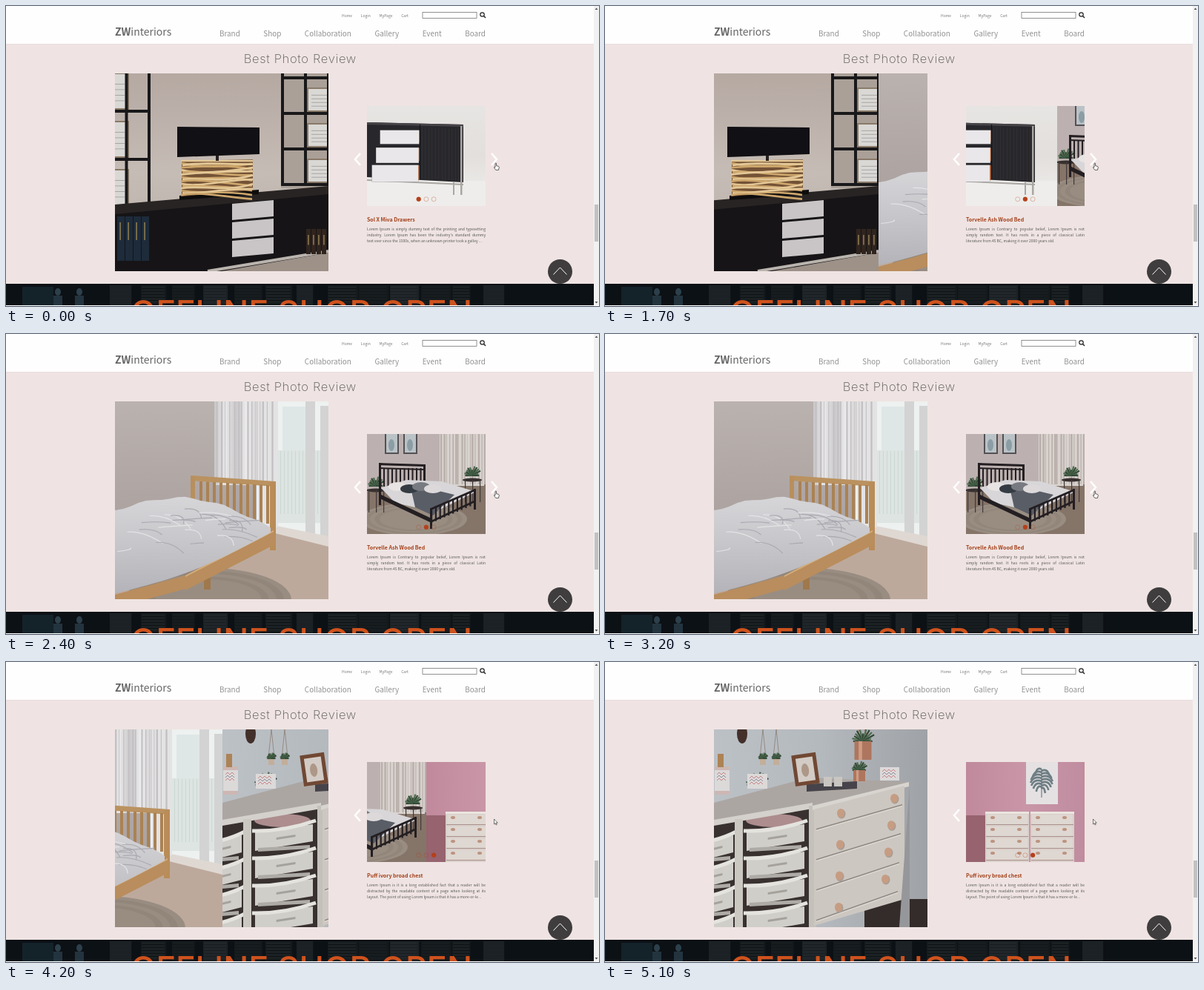
Write an HTML page that moves like this. It is 800 px wide and 405 px high and loops after 5200 ms.

```html
<!DOCTYPE html>
<html lang="en">
<head>
<meta charset="utf-8">
<title>Photo review slider</title>
<style>
html,body{margin:0;width:100%;height:100%;overflow:hidden;background:#efe4e3}
body{font-family:"Noto Sans CJK KR","Noto Sans CJK JP","Noto Sans",sans-serif}
svg{position:absolute;left:0;top:0;display:block}
nav{position:absolute;display:flex;justify-content:space-between;white-space:nowrap}
#menu{left:453px;top:9px;width:90px;font-size:5px;line-height:8px;color:#777}
#main{left:288px;top:29px;width:359px;font-size:9.9px;line-height:16px;font-weight:300;color:#919191}
#note{position:absolute;left:487px;top:282px;width:160px;color:#555}
#note b{display:block;font-size:7px;line-height:12px;color:#a33f18;margin-bottom:3px;white-space:nowrap}
#note div{font-size:5px;line-height:8px;height:8px;text-align:justify;text-align-last:justify}
#note div:last-child{text-align-last:left;white-space:nowrap}
</style>
</head>
<body>
<svg id="stage" width="800" height="405" viewBox="0 0 800 405"></svg>
<nav id="menu"><span>Home</span><span>Login</span><span>MyPage</span><span>Cart</span></nav>
<nav id="main"><span>Brand</span><span>Shop</span><span>Collaboration</span><span>Gallery</span><span>Event</span><span>Board</span></nav>
<div id="note"></div>
<script>
const BIG = {id: 'big', x: 147, y: 91, w: 288, h: 267};
const SMALL = {id: 'small', x: 487, y: 135, w: 160, h: 135};

// Box with upright sides; the right end of its top and bottom edges is raised by rise and lift
const box = (x, y, w, h, fill, rise = 0, lift = rise) =>
  `<path d="M${x} ${y}L${x + w} ${y - rise}V${y + h - lift}L${x} ${y + h}Z" fill="${fill}"/>`;
const line = (d, stroke, w = 1, fill = 'none') => `<path d="${d}" stroke="${stroke}" stroke-width="${w}" fill="${fill}"/>`;
const oval = (x, y, rx, ry, fill) => `<ellipse cx="${x}" cy="${y}" rx="${rx}" ry="${ry}" fill="${fill}"/>`;
const times = (n, fn) => Array.from({length: n}, (_, i) => fn(i)).join('');
const noise = n => { const v = Math.sin(n * 12.9898 + 4) * 43758.5453; return v - Math.floor(v); };
const backdrop = (view, fill) => box(view.x, view.y, view.w, view.h, fill);
const clip = v => `<clipPath id="${v.id}View">${backdrop(v, '#000')}</clipPath>`;
const grad = (id, down, ...stops) => `<linearGradient id="${id}" ${down ? 'x2="0" y2="1"' : ''}>${stops.map((c, i) =>
  `<stop offset="${i / (stops.length - 1)}" stop-color="${c}"/>`).join('')}</linearGradient>`;

const defs = `<defs>${clip(BIG)}${clip(SMALL)}
  ${grad('plaster', 1, '#b5a9a2', '#c5bcb5', '#b9aea8')}
  ${grad('bedroom', 1, '#bab2af', '#aea5a3', '#a39a98')}
  ${grad('curtain', 0, '#c9c7c8', '#e9e8e9', '#cbc9ca', '#eeeeef', '#d2d0d0')}
  ${grad('quilt', 1, '#d6d5d8', '#c6c5c9', '#b4b3b9')}
  ${grad('cool', 0, '#bcc1c6', '#b4b9be', '#9fa2a6')}
  ${grad('pink', 0, '#c08a9c', '#c996a8', '#c08c9f')}
  ${grad('studio', 1, '#e7e5e3', '#e2dfdc', '#f1f0ef')}
</defs>`;

const award = (x, y, w, h) => box(x, y, w, h, '#8a7a68') + box(x + 2, y + 2, w - 4, h - 4, '#d9d8d5') +
  times(4, i => box(x + 6, y + h * (.3 + i * .15), w - 12, .8, '#9b9a98'));
const binders = (x, y, n, w, h, fill) => times(n, i => box(x + i * w, y, w - 1, h, fill) + box(x + (i + .3) * w, y + 8, 1.6, h * .4, '#8d7b51'));
const folds = (x, y, w, h, n, tone) => times(n, i => box(x + (i + noise(i) * .6) * w / n, y, .5 + noise(i + 9) * 2, h, tone));
const rug = (x, y, rx, ry) => times(5, i => oval(x, y, rx * (1 - i * .09), ry * (1 - i * .09), i % 2 ? '#92867b' : '#998d82'));
const slats = (n, x, y, gap, w, h, fill, rise = 0) => times(n, i => box(x + i * gap, y - i * rise, w, h, fill));
const leaves = (x, y, r) => times(13, i => {
  const a = Math.PI * (1 + i / 12), len = r * (.7 + noise(i) * .6);
  return line(`M${x} ${y}l${len * Math.cos(a)} ${len * Math.sin(a)}`, i % 2 ? '#4f6b50' : '#324936', 2.2);
});

function shelving(x, w, y, gap, n, awardX) {
  const ink = '#19181a';
  return times(n, i => award(awardX, y + i * gap + 15, 34, gap - 15) + box(x, y + i * gap, w, 4, ink))
    + box(x, y + n * gap, w, 4, ink) + times(3, i => box(x + i * (w - 4) / 2, 80, 4, y + n * gap - 80, ink));
}

function sideboard() {
  const branch = i => {
    const y = 209 + i * 3.1, sway = k => y + 6 * Math.sin(i * k);
    return line(`M${236 + i % 3} ${y}C260 ${sway(2)} 295 ${sway(1.7)} ${333 - i % 2} ${sway(3)}`, i % 2 ? '#cda66c' : '#e4c897', 2.7);
  };
  return backdrop(BIG, 'url(#plaster)') + box(371, 91, 64, 155, '#aaa098')
    + shelving(130, 65, 75, 65, 3, 132) + shelving(371, 66, 95, 48, 3, 406)
    + box(147, 330, 288, 28, '#9d9188') + box(147, 268, 288, 14, '#292424', 25) + box(147, 281, 288, 102, '#161416', 27, 50)
    + line('M272 358L435 331', '#bab4ae', 4) + binders(150, 284, 4, 11, 60, '#1d2b3b') + binders(405, 301, 4, 7, 34, '#30241e')
    + times(3, i => box(305, 267 + i * 25, 56, 22, '#c9c5c6', 5))
    + box(234, 256, 107, 6, '#0e0d0e', 8) + box(237, 209, 96, 48, '#735236', 2, 8) + times(16, branch)
    + box(283, 199, 4, 10, '#262021') + box(231, 163, 111, 41, '#111014', -1, 4);
}

function drawers() {
  const drawer = i => {
    const x = 505 - i * 5.5, y = 168 + i * 23.5, w = 52 + i * 5, h = 18 + i * 2;
    return box(x + w - 2, y, 560 - x - w, h - 2, '#a34e21') + box(x - .5, y - .5, w + 1, h + 1, '#aaa7a7') + box(x, y, w, h, '#e9e7e9');
  };
  return backdrop(SMALL, 'url(#studio)') + box(487, 236, 160, 34, '#eeedeb') + box(487, 157, 130, 74, '#28272b', -3, -7)
    + box(487, 157, 130, 3, '#474448', -3) + slats(12, 561, 163, 4.5, .6, 70, '#38363c', -.3) + box(558, 160, 1, 74, '#111114')
    + box(487, 234, 130, 2, '#aaa6a2', -6) + box(603, 238, 2, 17, '#aaa6a2') + box(613, 162, 2.5, 93, '#aaa6a2')
    + times(3, drawer);
}

function oakBed() {
  const top = u => 238 + 24 * u - 28 * Math.sin(Math.PI * u) + 1.5 * Math.sin(u * 25);
  const hem = u => 350 - 82 * u + 10 * Math.sin(Math.PI * u);
  const at = (u, y) => `${BIG.x + 210 * u} ${y}`;
  const edge = [...Array(21).keys()].map(i => i / 20);
  const quilt = 'M' + edge.map(u => at(u, top(u))).concat(edge.reverse().map(u => at(u, hem(u)))).join('L') + 'Z';
  const crease = i => {
    const u = noise(i) * .75, v = .15 + noise(i + 30) * .5, y = top(u) + (hem(u) - top(u)) * v;
    return line(`M${at(u, y)}Q${at(u + .1, y - 2)} ${at(u + .08 + noise(i + 60) * .15, y + 25 * noise(i + 90) - 5)}`, i % 3 ? '#aaa9b0' : '#e4e3e6', 1.2);
  };
  return backdrop(BIG, 'url(#bedroom)') + box(147, 300, 288, 58, '#bda99c', 40, 0) + rug(273, 359, 112, 43)
    + box(338, 91, 97, 172, '#edf1f0', 0, -15) + slats(7, 373, 98, 4, 7, 80, '#dfe6e6') + box(364, 157, 72, 98, '#dde4e1')
    + slats(12, 365, 158, 5, .7, 85, '#c3d3cf') + slats(2, 404, 91, 20, 13, 185, '#d3d3d3', -6) + box(355, 257, 80, 10, '#dfd8d2', -16, -20)
    + box(281, 91, 59, 113, 'url(#curtain)') + box(340, 91, 27, 170, '#e3e3e3') + folds(282, 91, 80, 110, 14, '#c3c0c3')
    + box(249, 191, 115, 7, '#ba9260', -8) + slats(11, 261, 199, 9, 4, 52, '#aa8253', -.5)
    + box(249, 192, 6, 55, '#b88f5d') + box(356, 200, 8, 92, '#b98c58')
    + box(267, 325, 9, 20, '#9f784c') + box(147, 352, 95, 18, '#b98d5d', 26) + box(242, 326, 119, 20, '#b98d5d', 61) + box(242, 326, 119, 2, '#d5ae7c', 61)
    + `<path d="${quilt}" fill="url(#quilt)"/>` + times(26, crease);
}

function blackBed() {
  const ink = '#231e21';
  const print = i => box(511 + i * 25, 125, 19, 37, '#535155') + box(513 + i * 25, 125, 15, 35, '#bac2c6') + oval(520 + i * 25, 150, 4, 8, '#8b9da5');
  const table = (x, y) => oval(x, y, 13, 2.5, '#37302f') + slats(3, x - 10, y, 10, 1.2, 30, '#413938') + leaves(x, y - 6, 10);
  const pillow = (c, i) => oval(528 + i * 16, 206 + i % 2 * 3, 12, 6, c);
  return backdrop(SMALL, '#bcb1b0') + box(487, 213, 160, 57, '#857468', 14, 0) + rug(550, 250, 72, 22)
    + box(585, 135, 60, 70, '#d9d3cf') + folds(585, 135, 62, 68, 16, '#b9afaa')
    + times(2, print) + table(499, 211) + table(629, 197)
    + box(503, 174, 62, 3, ink, -2) + box(503, 180, 62, 2, ink, -2) + slats(10, 509, 181, 5.5, 2, 25, ink) + box(503, 174, 3, 57, ink) + box(563, 176, 3, 30, ink)
    + `<path d="M506 208L540 197 588 199 634 213 579 240 525 228Z" fill="#d8d6d8"/><path d="M547 212L572 209 605 217 576 245 552 234Z" fill="#595d66"/>`
    + ['#e7e4e3', '#353b43', '#777a80', '#ddd9da'].map(pillow).join('')
    + box(504, 216, 70, 6, ink, -33) + box(573, 235, 60, 3, ink, 26) + box(573, 252, 60, 3, ink, 28)
    + slats(11, 573, 235, 5.8, 2.2, 20, ink, 2.5) + box(572, 235, 3, 28, ink) + box(631, 209, 3, 28, ink);
}

function tallChest() {
  const basket = (x, w, y) => box(x + 4, y, w - 8, 27, '#d0cec9', 9, 13) + box(x + 8, y + 23, w - 16, 5, '#aeaba6', 4)
    + line(`M${x} ${y}Q${x + w / 2} ${y + 1} ${x + w} ${y - 14}`, '#e4e3de', 5) + box(x + w * .38, y + 9, w * .3, 3, '#a5a29c', 4);
  const vase = x => line(`M${x} 91l-4 38M${x} 91l4 38`, '#857669', .7) + box(x - 4, 129, 8, 10, '#c3ae9a') + leaves(x, 130, 6);
  const pot = (x, y, w, h) => leaves(x, y, w * .6) + box(x - w / 2, y, w, h, '#ae765e') + box(x - w / 4, y, w / 5, h, '#cf9c84');
  const card = (x, y, w, h) => box(x, y, w, h, '#dcd9d9') + times(3, i =>
    line(`M${x + 3} ${y + 6 + i * 4}` + 'l3 -3l3 3'.repeat(w / 7), i % 2 ? '#8e8c98' : '#c78386'));
  const knob = (x, y) => oval(x + 1, y + 1, 5.5, 6.5, '#a99c93') + oval(x, y, 5, 6, '#c69d83');
  return backdrop(BIG, 'url(#cool)') + box(350, 320, 85, 40, '#342c2a') + oval(185, 97, 7, 13, '#43302b') + vase(213) + vase(231)
    + `<path d="M147 190L275 156 410 162 280 197 147 222Z" fill="#aca6a2"/>` + box(272, 165, 68, 10, '#46434a', 4)
    + box(148, 141, 20, 38, '#cdb7b3') + card(148, 146, 20, 28) + box(152, 124, 8, 18, '#ad8355')
    + leaves(205, 166, 14) + card(192, 151, 27, 20)
    + `<g transform="rotate(-8 270 145)">${box(254, 124, 33, 42, '#704833') + box(259, 129, 23, 32, '#d3cbc5') + oval(270, 146, 5, 9, '#ad9787')}</g>`
    + slats(2, 295, 155, 14, 11, 13, '#c9c6c1') + line('M343 91l-6 18M350 91l8 18', '#a9785f')
    + pot(348, 107, 23, 25) + pot(343, 146, 16, 15) + card(371, 142, 26, 18)
    + box(147, 219, 133, 150, '#383130', 23, 0) + oval(228, 214, 38, 9, '#ad8d8e')
    + times(4, i => basket(187, 86, 228 + i * 37) + basket(119, 58, 243 + i * 37))
    + box(147, 213, 133, 8, '#d4d0cb', 23) + box(175, 212, 11, 146, '#cbc7c1') + box(275, 194, 10, 164, '#c4c0ba')
    + box(280, 194, 130, 6, '#d8d4cf', 32) + box(282, 199, 122, 157, '#cdc7c1', 32, 36)
    + times(4, i => box(285, 225 + i * 41, 116 - i * 2, 1.5, '#8c8680', 33 + i * 2) + box(285, 227 + i * 41, 116 - i * 2, 1, '#e1ddd7', 33 + i * 2))
    + times(4, i => knob(318 - i, 204 + i * 42.3) + knob(390 - i * 4, 184 + i * 36.3))
    + `<path d="M411 166V358H397Z" fill="#96979a"/>`;
}

function pinkRoom() {
  const drawer = (x, y) => box(x + 2, y, 55, 13, '#dfd7d1') + box(x + 1, y + 13, 57, 1, '#aa918d') + oval(x + 10, y + 4, 3, 2, '#bc9380') + oval(x + 46, y + 4, 3, 2, '#bc9380');
  const chest = x => box(x, 202, 59, 68, '#d9cfca') + box(x, 202, 59, 3, '#eae5df') + times(4, i => drawer(x, 206 + i * 16));
  const leaf = i => {
    const side = i % 2 ? 1 : -1, y = 145 + i * 2, reach = side * 15 * Math.sin(.6 + i * .17);
    return line(`M589 ${y}q${reach * .7} -4 ${reach} 6`, '#6e7e84', 2.6);
  };
  return backdrop(SMALL, 'url(#pink)') + box(487, 207, 26, 63, '#96636f') + box(568, 135, 43, 57, '#e5e1e3')
    + times(14, leaf) + box(588.5, 145, 1, 38, '#5d6b72') + chest(513) + chest(574);
}

const inter = 'text-anchor="middle" style="font-family:Inter,sans-serif"';
const header = box(0, 0, 793, 51, '#fefefe') + box(0, 51, 793, .6, '#e3dada')
  + '<text x="147" y="40.3" font-size="14" fill="#666"><tspan font-weight="700">ZW</tspan>interiors</text>'
  + '<rect x="562" y="8.5" width="73" height="8" fill="#fff" stroke="#777" stroke-width=".8"/>'
  + line('M644.5 13.5L647 16', '#222', 1.4) + '<circle cx="642.5" cy="11.5" r="2.7" fill="none" stroke="#222" stroke-width="1.2"/>'
  + `<text x="396.8" y="77" font-size="16.5" font-weight="200" letter-spacing=".7" fill="#555" ${inter}>Best Photo Review</text>`;

const person = x => oval(x, 386, 4, 5, '#2c404b') + box(x - 6, 391, 12, 14, '#23343f');
const panel = i => box(140 + i * 42, 377, 20 + noise(i) * 22, 28, i % 3 ? '#14191c' : '#1b2124') +
  times(6, k => box(141 + i * 42, 379 + k * 4, 18 + noise(i) * 20, .7, i % 2 ? '#2a3033' : '#1d2326'));
const banner = box(0, 375, 793, 30, '#0c1115') + times(13, panel) + box(22, 379, 42, 26, '#14222a') + person(70) + person(99)
  + `<text x="398.5" y="430" font-size="45" font-weight="500" fill="#cf521d" ${inter}>OFFLINE SHOP OPEN</text>`;

const chrome = box(793, 0, 7, 405, '#f1f1f1') + box(794, 268, 5, 50, '#c1c1c1')
  + line('M794.5 5h4l-2 -2.5zM794.5 399h4l-2 2.5z', 'none', 0, '#555') + box(0, 404, 800, 1, '#fff')
  + oval(747.5, 358.5, 16.5, 16.5, '#3f3d3d') + line('M738.5 362.5l9 -9.5l9 9.5', '#fff');

const strip = (view, scenes) => `<g clip-path="url(#${view.id}View)"><g id="${view.id}">${scenes.map((scene, i) =>
  `<g transform="translate(${i * view.w})"><g clip-path="url(#${view.id}View)">${scene()}</g></g>`).join('')}</g></g>`;
const hand = '<path id="hand" d="M660 212.5q1-1 1.6 0v3.2l3 .8q.9.4.6 1.7l-.7 3.2h-3.7l-2.4-3.3q0-1.4 1.6-.2z" fill="#fff" stroke="#222" stroke-width=".7"/>';
const pointer = '<path id="pointer" d="M658.5 212v7l1.6-1.4 1.1 2.4 1-.5-1.1-2.3h2.2z" fill="#fff" stroke="#222" stroke-width=".6"/>';

const el = id => document.getElementById(id);
el('stage').innerHTML = defs + box(0, 0, 800, 405, '#efe4e3') + header + banner
  + strip(BIG, [sideboard, oakBed, tallChest]) + strip(SMALL, [drawers, blackBed, pinkRoom])
  + times(3, i => `<circle class="dot" cx="${556.7 + i * 10.2}" cy="260.8" r="3" stroke="#b5401a" stroke-opacity=".55" stroke-width=".6"/>`)
  + line('M478 199l-7 8l7 8', '#fff', 2.5) + `<g id="next">${line('M655 199l7 8l-7 8', '#fff', 2.5)}</g>`
  + chrome + hand + pointer;

const notes = [
  ['Sol X Miva Drawers', 'Lorem Ipsum is simply dummy text of the printing and typesetting', 'industry. Lorem Ipsum has been the industry\'s standard dummy', 'text ever since the 1500s, when an unknown printer took a galley ...'],
  ['Torvelle Ash Wood Bed', 'Lorem Ipsum is Contrary to popular belief, Lorem Ipsum is not', 'simply random text. It has roots in a piece of classical Latin', 'literature from 45 BC, making it over 2000 years old.'],
  ['Puff ivory broad chest', 'Lorem Ipsum is it is a long established fact that a reader will be', 'distracted by the readable content of a page when looking at its', 'layout. The point of using Lorem Ipsum is that it has a more-or-le...']
];

const LOOP = 5200, TICK = 100, SLIDE = 1040;
const starts = [1370, 3682];
const swing = p => .5 - Math.cos(Math.PI * Math.min(1, Math.max(0, p))) / 2;
let shown = -1;

function showSlide(n) {
  shown = n;
  const [title, ...lines] = notes[n], last = n === notes.length - 1;
  el('note').innerHTML = `<b>${title}</b>` + lines.map(s => `<div>${s}</div>`).join('');
  document.querySelectorAll('.dot').forEach((dot, i) => dot.setAttribute('fill', i === n ? '#b5401a' : 'none'));
  el('next').style.display = el('hand').style.display = last ? 'none' : '';
  el('pointer').style.display = last ? '' : 'none';
}

function draw(now) {
  const t = Math.floor(now % LOOP / TICK) * TICK;
  const slide = starts.filter(start => t >= start).length;
  const offset = starts.reduce((sum, start) => sum + swing((t - start) / SLIDE), 0);
  if (slide !== shown) showSlide(slide);
  for (const view of [BIG, SMALL]) el(view.id).setAttribute('transform', `translate(${-Math.round(view.w * offset)})`);
}

const began = performance.now();
function loop() {
  draw(performance.now() - began);
  requestAnimationFrame(loop);
}
loop();
</script>
</body>
</html>
```
